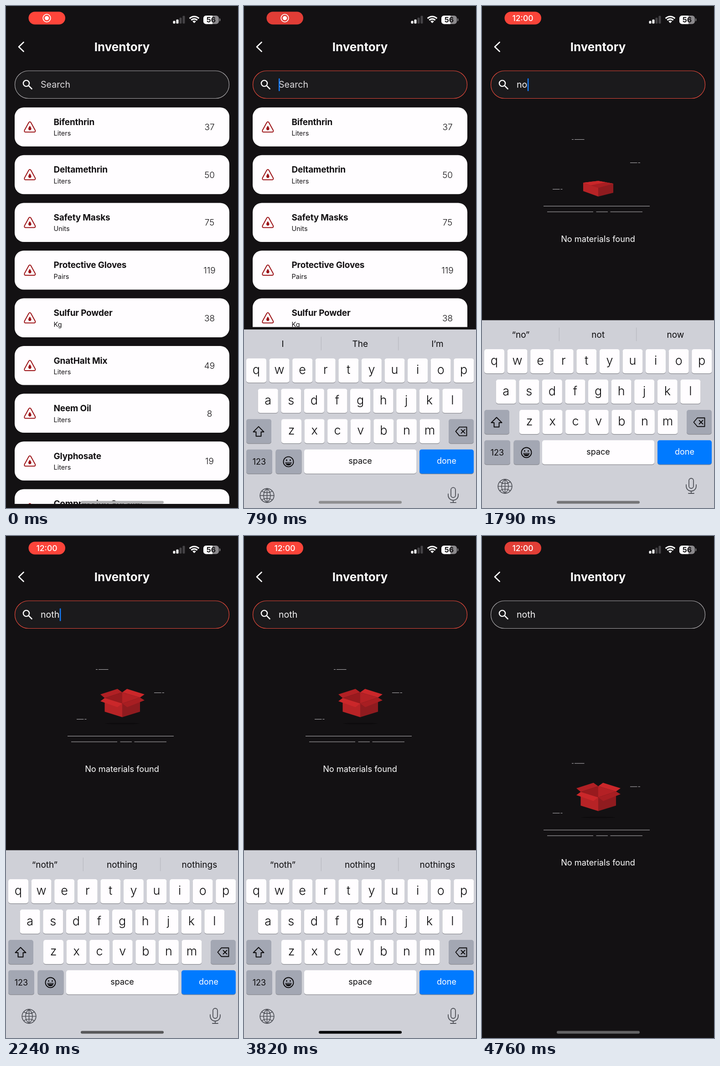
Write an HTML page with a canvas that moves like this. It is 509 by 1100 pixels and loops after 4.79 s.

```html
<!DOCTYPE html>
<html lang="en">
<head>
<meta charset="utf-8">
<title>Inventory search</title>
<style>
html, body { margin: 0; width: 100%; height: 100%; overflow: hidden; background: #131113; }
canvas { display: block; }
</style>
</head>
<body>
<canvas id="stage" width="509" height="1100"></canvas>
<script>
const ctx = document.getElementById('stage').getContext('2d');
const LOOP = 4790, KB_TOP = 688.5, KB_HEIGHT = 411.5;
const OPEN = 526, CLOSE = 4042, LAG = 12;
const BG = '#131113';
const WORD = 'noth', TYPED_AT = [1330, 1680, 1990, 2200];
const HINTS = [
  ['I', 'The', 'I’m'], ['“n”', 'not', 'no'], ['“no”', 'not', 'now'],
  ['“not”', 'nothing', 'note'], ['“noth”', 'nothing', 'nothings']
];
const ITEMS = [
  ['Bifenthrin', 'Liters', 37], ['Deltamethrin', 'Liters', 50], ['Safety Masks', 'Units', 75],
  ['Protective Gloves', 'Pairs', 119], ['Sulfur Powder', 'Kg', 38], ['GnatHalt Mix', 'Liters', 49],
  ['Neem Oil', 'Liters', 8], ['Glyphosate', 'Liters', 19], ['Compression Sprayer', 'Units', 12]
];
// first key x, row y, letters
const ROWS = [[5, 752, 'qwertyuiop'], [30.7, 818.5, 'asdfghjkl'], [82, 885, 'zxcvbnm']];
const INDICATOR = [[0, 176], [450, 176], [670, 142], [1030, 143], [1790, 117], [2820, 51], [3800, 0], [4200, 0], [4600, 99]];

const clamp = v => Math.max(0, Math.min(1, v));
const ramp = (t, a, b) => clamp((t - a) / (b - a));
const mix = (a, b, p) => a + (b - a) * p;
const mixPt = (a, b, p) => [mix(a[0], b[0], p), mix(a[1], b[1], p)];

// critically damped spring, 0 to 1
function spring(ms) {
  const x = Math.max(0, ms) * 0.018;
  return 1 - (1 + x) * Math.exp(-x);
}

function keyed(points, t) {
  const i = points.findIndex(p => p[0] > t);
  if (i < 0) return points[points.length - 1][1];
  const [a, b] = [points[i - 1], points[i]];
  return mix(a[1], b[1], ramp(t, a[0], b[0]));
}

function text(s, x, y, size, { color = '#fff', weight = 400, align = 'left', spacing = 0 } = {}) {
  ctx.font = `${weight} ${size}px Inter, sans-serif`;
  ctx.letterSpacing = spacing + 'px';
  ctx.textAlign = align;
  ctx.fillStyle = color;
  ctx.fillText(s, x, y);
}

function box(x, y, w, h, r, color) {
  ctx.beginPath();
  ctx.roundRect(x, y, w, h, r);
  ctx.fillStyle = color;
  ctx.fill();
}

function fill(d, color) {
  ctx.fillStyle = color;
  ctx.fill(new Path2D(d));
}

function stroke(d, color, width) {
  ctx.strokeStyle = color;
  ctx.lineWidth = width;
  ctx.stroke(new Path2D(d));
}

function dot(x, y, r, color, line) {
  ctx.beginPath();
  ctx.arc(x, y, r, 0, 7);
  ctx.fillStyle = ctx.strokeStyle = color;
  ctx.lineWidth = line;
  line ? ctx.stroke() : ctx.fill();
}

function poly(points, color) {
  ctx.beginPath();
  points.forEach(p => ctx.lineTo(...p));
  ctx.closePath();
  ctx.fillStyle = color;
  ctx.fill();
}

function statusBar(t) {
  const glow = 0.5 + 0.5 * Math.cos((t - 50) / 1000 * Math.PI);
  box(49.5, 12.5, 80.5, 28, 14, `rgb(${mix(219, 255, glow)},${mix(60, 69, glow)},${mix(53, 58, glow)})`);
  const clock = ramp(t, 1400, 1550);
  ctx.globalAlpha = 1 - clock;
  dot(89.5, 26.5, 8.3, '#fff', 1.8);
  dot(89.5, 26.5, 4.6, '#fff');
  ctx.globalAlpha = clock;
  text('12:00', 89.5, 33, 17.5, { weight: 500, align: 'center' });
  ctx.globalAlpha = 1;

  [6, 9, 13, 17].forEach((h, i) => box(366.5 + 7 * i, 38.5 - h, 5, h, 1.5, i < 2 ? '#fff' : '#454346'));
  ctx.lineCap = 'butt';
  for (const [r, w] of [[14.5, 3.2], [9.2, 3.2], [2.7, 5.4]]) {
    ctx.beginPath();
    ctx.arc(413, 37.5, r, -Math.PI * 0.75, -Math.PI * 0.25);
    ctx.strokeStyle = '#fff';
    ctx.lineWidth = w;
    ctx.stroke();
  }
  ctx.lineCap = 'round';
  box(433, 21, 34, 18.5, 6, '#8b898c');
  box(433, 21, 20, 18.5, [6, 0, 0, 6], '#fff');
  box(468.3, 27, 2, 6.5, [0, 2, 2, 0], '#8b898c');
  text('56', 450, 36, 16, { color: '#131113', weight: 700, align: 'center' });
}

function header() {
  stroke('M38.5 79.5L28 89.5L38.5 99.5', '#fff', 2.7);
  text('Inventory', 254.5, 98.5, 26, { weight: 700, align: 'center' });
}

function searchField(t, typed, focused) {
  ctx.beginPath();
  ctx.roundRect(19.5, 142, 470, 60.5, 30);
  ctx.fillStyle = '#1b1a1c';
  ctx.fill();
  ctx.strokeStyle = focused ? '#e5493b' : '#aaa8ab';
  ctx.lineWidth = 1.2;
  ctx.stroke();
  dot(44.5, 169.5, 6.6, '#fff', 2.4);
  stroke('M49.7 174.7L56.5 181.5', '#fff', 2.6);
  text(typed || 'Search', 76, 179, 19.6, { color: typed ? '#f5f4f5' : '#dedcdf' });
  if (!focused) return;
  const end = typed ? ctx.measureText(typed).width + 0.5 : 0;
  const since = (t - (typed ? TYPED_AT[typed.length - 1] : OPEN - 45)) % 1000;
  ctx.globalAlpha = since < 800 ? 1 - ramp(since, 500, 600) : ramp(since, 850, 1000);
  box(76 + end, 158.5, 2.6, 28, 1.2, '#1479f5');
  ctx.globalAlpha = 1;
}

function card([name, unit, count], y) {
  box(19, y, 471, 85.5, 20, '#fffdff');
  ctx.save();
  ctx.translate(0, y);
  stroke('M50 33Q52.3 30 54.6 33L64 50Q65.2 53.6 62 54H42.5Q39.5 53.6 40.6 50Z', '#9c1317', 2);
  fill('M52.3 40Q56.3 45.5 55.5 47.6A3.3 3.3 0 0 1 49.1 47.6Q48.3 45.5 52.3 40Z', '#9c1317');
  text(name, 104.5, 38.5, 19, { color: BG, weight: 700, spacing: -0.2 });
  text(unit, 104.5, 62, 14.5, { color: BG });
  text(count, 446.5, 50, 19, { color: BG, weight: 300, align: 'center' });
  ctx.restore();
}

function list(items, bottom) {
  ctx.save();
  ctx.beginPath();
  ctx.rect(0, 205, 509, bottom - 205);
  ctx.clip();
  items.forEach((item, i) => card(item, 222.3 + 104.55 * i));
  ctx.restore();
}

// carton around its lowest corner; p goes from shut to open
function carton(p) {
  const at = (shut, open) => mixPt(shut, open, p);
  const left = at([-33, -30], [-38.5, -42]), front = at([0, -19], [0, -30]);
  const right = at([33, -28], [39, -43]), back = at([0, -34], [0, -54.5]);
  const footL = at([-33, -12], [-38.5, -12]), footR = at([33, -8], [39, -12]);
  const flap = (a, b, a2, b2, openA, openB, color) =>
    poly([a, b, at(mixPt(b, b2, 0.5), openB), at(mixPt(a, a2, 0.5), openA)], color);

  poly([left, back, front], '#981a1e');
  poly([back, right, front], '#b42125');
  poly([left, front, [0, 0], footL], '#b72326');
  poly([front, right, footR, [0, 0]], '#8f1b1f');
  flap(left, back, front, right, [-48, -50], [-10.5, -62], '#b12024');
  flap(back, right, left, front, [10.5, -62], [49, -50], '#cb272a');
  flap(left, front, back, right, [-48, -35], [-10.5, -22], '#cb272a');
  flap(front, right, left, back, [11, -22], [49, -37], '#a81e22');
}

function emptyState(t, shift) {
  ctx.save();
  ctx.translate(0, shift);
  ctx.lineCap = 'butt';
  stroke('M197 292.5h4M203 292.5h21.5M325 343.5h15.5M342.5 343.5h4.5M155 401.5h15.5M172.5 401.5h4' +
    'M135 438.5h233M143 451h101M250.5 451h25.5M281.5 451h70.5', '#b9b7ba', 1.1);
  ctx.lineCap = 'round';
  const open = 1 - Math.pow(1 - ramp(t, 1790, 2300), 3);
  ctx.globalAlpha = open;
  ctx.beginPath();
  ctx.ellipse(255, 411, 38, 1.6, 0, 0, 7);
  ctx.fillStyle = '#0d0b0d';
  ctx.fill();
  ctx.globalAlpha = 1;

  ctx.save();
  ctx.translate(255, mix(417.5, 397, open));
  carton(open);
  ctx.restore();

  const out = 1 - Math.pow(1 - ramp(t, 2200, 2850), 2);
  ctx.globalAlpha = ramp(t, 2200, 2400) * (1 - ramp(t, 2800, 3150));
  for (const end of [[274, 285], [324, 321], [187, 330]]) {
    const [x, y] = mixPt([255, 350], end, out);
    stroke(`M${x - 1.4} ${y - 1.4}l2.8 2.8m0 -2.8l-2.8 2.8`, '#92191f', 0.9);
  }
  ctx.globalAlpha = 1;
  text('No materials found', 254.5, 516.5, 18.2, { align: 'center' });
  ctx.restore();
}

function key(x, y, w, color = '#fffdff') {
  box(x, y + 1.3, w, 53, 5, '#898a90');
  box(x, y, w, 53, 5, color);
}

function popup(x, y, letter) {
  ctx.save();
  ctx.shadowColor = 'rgba(0,0,0,.3)';
  ctx.shadowBlur = 5;
  ctx.translate(x, y);
  fill('M-14 -60Q-14 -69 -5 -69H49Q58 -69 58 -60V-18C58 -6 44 -8 44 6V48Q44 53 39 53H5Q0 53 0 48V6C0 -8 -14 -6 -14 -18Z', '#fffdff');
  ctx.restore();
  text(letter, x + 22, y - 20, 40, { color: '#0b0a0c', weight: 300, align: 'center' });
}

function keyboard(t, typed, drop) {
  const ink = '#0b0a0c', grey = '#a3a7b3', small = '#505259';
  const mid = { color: ink, align: 'center' };
  ctx.save();
  ctx.translate(0, drop);
  box(0, KB_TOP, 509, KB_HEIGHT, 0, '#cfd0d7');
  HINTS[typed.length].forEach((hint, i) => text(hint, 85 + 169.7 * i, 726.5, 19, mid));
  stroke('M169.3 705v29M338.8 705v29', '#b3b4bb', 1);

  let pressed;
  for (const [x0, y, letters] of ROWS) {
    [...letters].forEach((letter, i) => {
      const x = x0 + 50.58 * i;
      key(x, y, 44);
      text(letter, x + 22, y + 34, 27, { ...mid, weight: 300 });
      const n = WORD.indexOf(letter);
      if (n >= 0 && t > TYPED_AT[n] - 80 && t < TYPED_AT[n] + 30) pressed = [x, y, letter];
    });
  }

  key(5, 885, 55, grey);
  stroke('M32 901.5L43.5 913H37.5V922.5H26.5V913H20.5Z', ink, 2);
  key(449, 885, 55, grey);
  stroke('M464.5 912L472.5 902.5H488.5V921.5H472.5ZM476.5 908l8 8m0 -8l-8 8', ink, 1.9);

  key(5, 951.5, 57, grey);
  text('123', 33.5, 984.5, 18, mid);
  key(69.5, 951.5, 57, grey);
  dot(97.5, 978.5, 11, ink, 1.9);
  dot(93.5, 975, 1.6, ink);
  dot(101.5, 975, 1.6, ink);
  fill('M90.5 979.5H104.5Q103.5 986.5 97.5 986.5Q91.5 986.5 90.5 979.5Z', ink);
  stroke('M92.5 981.5H102.5', grey, 1.2);
  key(132, 951.5, 246);
  text('space', 255, 983, 18, mid);
  const done = t > 3910 && t < CLOSE;
  key(385, 951.5, 119, done ? '#fffdff' : '#007aff');
  text('done', 444.5, 983, 18, { color: done ? ink : '#fff', align: 'center' });

  dot(50.5, 1052.5, 15.3, small, 1.7);
  stroke('M50.5 1037.2v30.6M35.2 1052.5h30.6M39 1043q11.5 7 23 0M39 1062q11.5 -7 23 0' +
    'M50.5 1037.2c-10 8 -10 22.6 0 30.6c10 -8 10 -22.6 0 -30.6', small, 1.6);
  stroke('M454 1040a5 5 0 0 1 10 0v12a5 5 0 0 1 -10 0ZM448 1049v3a11 11 0 0 0 22 0v-3M459 1063v5M453 1068h12', small, 1.8);
  if (pressed) popup(...pressed);
  ctx.restore();
}

function frame(now) {
  const t = now % LOOP;
  const typed = WORD.slice(0, TYPED_AT.filter(at => at <= t).length);
  const raised = time => spring(time - OPEN) - spring(time - CLOSE);
  box(0, 0, 509, 1100, 0, BG);
  ctx.lineCap = ctx.lineJoin = 'round';
  statusBar(t);
  header();
  searchField(t, typed, t >= OPEN && t < CLOSE);
  if (typed.length < 2) {
    const found = ITEMS.filter(item => item[0].toLowerCase().includes(typed));
    list(found, 1091 - KB_HEIGHT * raised(t - LAG));
  } else {
    emptyState(t, KB_HEIGHT / 2 * spring(t - LAG - CLOSE));
  }
  keyboard(t, typed, KB_HEIGHT * (1 - raised(t)));
  const g = keyed(INDICATOR, t);
  box(164, 1084.5, 182, 6, 3, `rgb(${g},${g},${g + 2})`);
  requestAnimationFrame(frame);
}
requestAnimationFrame(frame);
</script>
</body>
</html>
```
